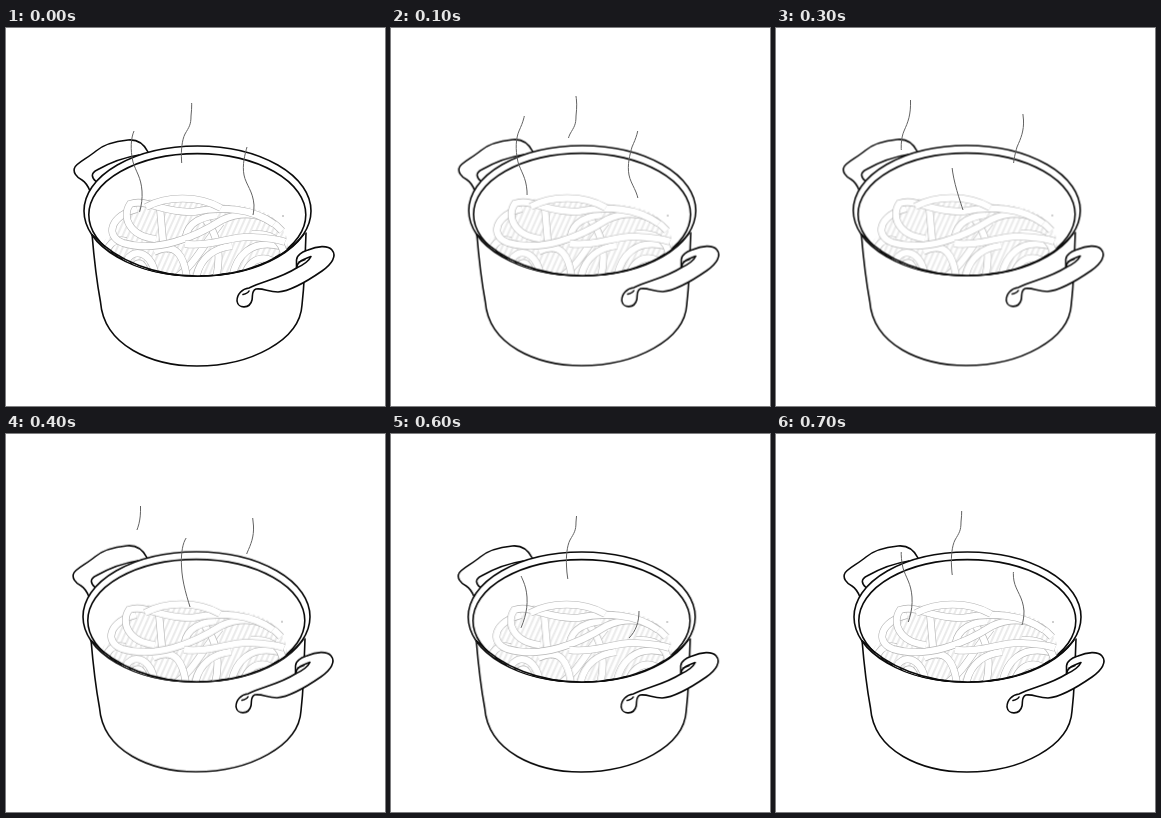
An HTML page for the animation above (800 ms loop, 379 by 378 pixels).

```html
<!DOCTYPE html>
<html lang="en">
<head>
<meta charset="utf-8">
<title>Steaming pot</title>
<style>
html, body { margin: 0; width: 100%; height: 100%; overflow: hidden; background: #fff; }
svg { display: block; width: 100%; height: 100%; }
.ink { fill: none; stroke: #0b0b0b; stroke-width: 1.6; stroke-linecap: round; stroke-linejoin: round; }
.solid { fill: #fff; }
.edge, .core { fill: none; stroke: #b4b4b4; stroke-width: 7.6; }
.core { stroke: #fff; stroke-width: 6.4; }
.steam { fill: none; stroke: #626262; stroke-width: 1; }

#pot, .window { animation: wobble 800ms step-end infinite; }
#leftWin { animation-name: left; }
#midWin { animation-name: mid; }
#rightWin { animation-name: right; }

@keyframes wobble {
  0% { transform: translate(0, 0); }
  12.5% { transform: translate(-.3px, -.4px); }
  25% { transform: translate(-.5px, -.7px); }
  37.5% { transform: translate(-.7px, -.5px); }
  50% { transform: translate(-1px, -.3px); }
  62.5% { transform: translate(.1px, 0); }
  75% { transform: translate(-.8px, 0); }
  87.5% { transform: translate(0, 0); }
}
/* Each wisp is a fixed curve seen through a moving window. */
@keyframes left {
  0% { y: 103px; height: 81px; }
  12.5% { y: 88px; height: 79px; }
  25% { y: 77px; height: 70px; }
  37.5% { y: 72px; height: 50px; }
  50% { y: 72px; height: 24px; }
  62.5% { y: 170px; height: 33px; }
  75% { y: 142px; height: 52px; }
  87.5% { y: 118px; height: 70px; }
}
@keyframes mid {
  0% { y: 75px; height: 60px; }
  12.5% { y: 68px; height: 42px; }
  25% { y: 65px; height: 20px; }
  37.5% { y: 140px; height: 42px; }
  50% { y: 104px; height: 69px; }
  62.5% { y: 91px; height: 64px; }
  75% { y: 82px; height: 63px; }
  87.5% { y: 77px; height: 64px; }
}
@keyframes right {
  0% { y: 119px; height: 68px; }
  12.5% { y: 103px; height: 67px; }
  25% { y: 91px; height: 59px; }
  37.5% { y: 86px; height: 49px; }
  50% { y: 84px; height: 36px; }
  62.5% { y: 82px; height: 14px; }
  75% { y: 177px; height: 27px; }
  87.5% { y: 138px; height: 53px; }
}
</style>
</head>
<body>
<svg viewBox="0 0 379 378">
  <defs>
    <clipPath id="mouth"><ellipse cx="191.3" cy="186.8" rx="108.5" ry="61.2"/></clipPath>
    <clipPath id="leftClip"><rect id="leftWin" class="window" x="100" y="103" width="60" height="81"/></clipPath>
    <clipPath id="midClip"><rect id="midWin" class="window" x="160" y="75" width="50" height="60"/></clipPath>
    <clipPath id="rightClip"><rect id="rightWin" class="window" x="220" y="119" width="50" height="68"/></clipPath>
    <pattern id="strands" width="5" height="5" patternUnits="userSpaceOnUse" patternTransform="rotate(24)">
      <path d="M1 0V5" stroke="#c4c4c4" stroke-width=".7"/>
    </pattern>
  </defs>

  <g id="pot">
    <path class="ink" d="M84 163C82 158 79 154 76 152C70 149 67 144 68.5 140C70 135 82 130 90 123C98 116 112 113 122 112C133 111 139 118 142 124M90 153.500C85 149 85 145 91 142C105 134 120 129 133 127"/>
    <path class="ink" d="M86 206C88 230 91 255 94.500 274C98 318 146 338 191 338C245 338 294 312 296 277C297 268 298 255 298.500 245L300 205"/>
    <ellipse class="ink solid" cx="191.500" cy="183" rx="113.500" ry="65"/>
    <ellipse class="ink" cx="191.300" cy="186.800" rx="108.500" ry="61.200"/>
    <g clip-path="url(#mouth)">
      <path fill="url(#strands)" d="M95 222C99 207 104 210 106 202C108 191 118 186 120 178C132 168 155 173 175 168C192 166 202 176 222 177C250 177 273 188 278 204C284 210 281 226 283 232L250 255H130Z"/>
      <g id="pasta"></g>
      <circle cx="277" cy="188" r=".7" fill="#777"/>
    </g>
    <path class="ink" d="M86 206.500C112 234 150 248 191.500 248C238 248 279 231 298 206"/>
    <path class="ink solid" d="M290.500 240V232C291 226 297 224 302 222C311 218 322 217 326 222C331 228 326 236 316 243C303 252 286 263 272 264C262 264 258 260 250 261C245 263 247 268 246 272C244 281 232 281 231 273C231 266 236 261 243 260C258 253 275 250 290.500 240Z"/>
    <path class="ink" d="M291 238C293 232 299 231 305 228.500C303 233 297 237 290.500 240M293 234L299 231.500M237 266.500C239 266 242 265 243 263"/>
  </g>

  <g class="steam">
    <path clip-path="url(#leftClip)" d="M126 203C132 190 137 178 136 163C135 149 130 144 127 134C124 121 125 110 128 103C132 94 135 87 134.500 72"/>
    <path clip-path="url(#midClip)" d="M187 182C181 164 176 148 175.500 132C175 122 176 112 179 106C183 99 185 97 185 88C186 79 186 73 184.500 65"/>
    <path clip-path="url(#rightClip)" d="M238 204C245 197 248 188 248 177C247 163 240 157 238 147C236 137 239 126 241 119C245 110 248 103 247.500 92L246.500 82"/>
  </g>
</svg>
<script>
// Later strands lie on top of earlier ones.
const strands = [
  "M99 240C98 222 104 209 120 213",
  "M154 180L158 225",
  "M170 250C190 235 195 220 215 195",
  "M210 250C216 225 211 205 198 190",
  "M226 250C230 228 245 211 274 218",
  "M279 240C280 215 270 205 246 206",
  "M118 250C115 218 146 216 150 250",
  "M126 250C128 230 138 231 140 250",
  "M148 224C170 213 178 228 181 250",
  "M238 250C242 226 268 226 270 240",
  "M190 250C194 230 208 220 226 218",
  "M179 216C179 199 188 190 211 187",
  "M131 181C105 187 98 208 117 215C150 225 188 210 216 192C240 181 262 187 276 203",
  "M150 211C122 208 116 188 124 176C140 170 155 185 187 184C215 178 246 180 268 196",
  "M140 179C160 168 192 167 215 180",
  "M179 216C205 219 225 208 244 209S272 211 279 214"
];
const pasta = document.getElementById("pasta");
for (const d of strands) {
  for (const part of ["edge", "core"]) {
    const path = document.createElementNS("http://www.w3.org/2000/svg", "path");
    path.setAttribute("class", part);
    path.setAttribute("d", d);
    pasta.append(path);
  }
}
</script>
</body>
</html>
```
